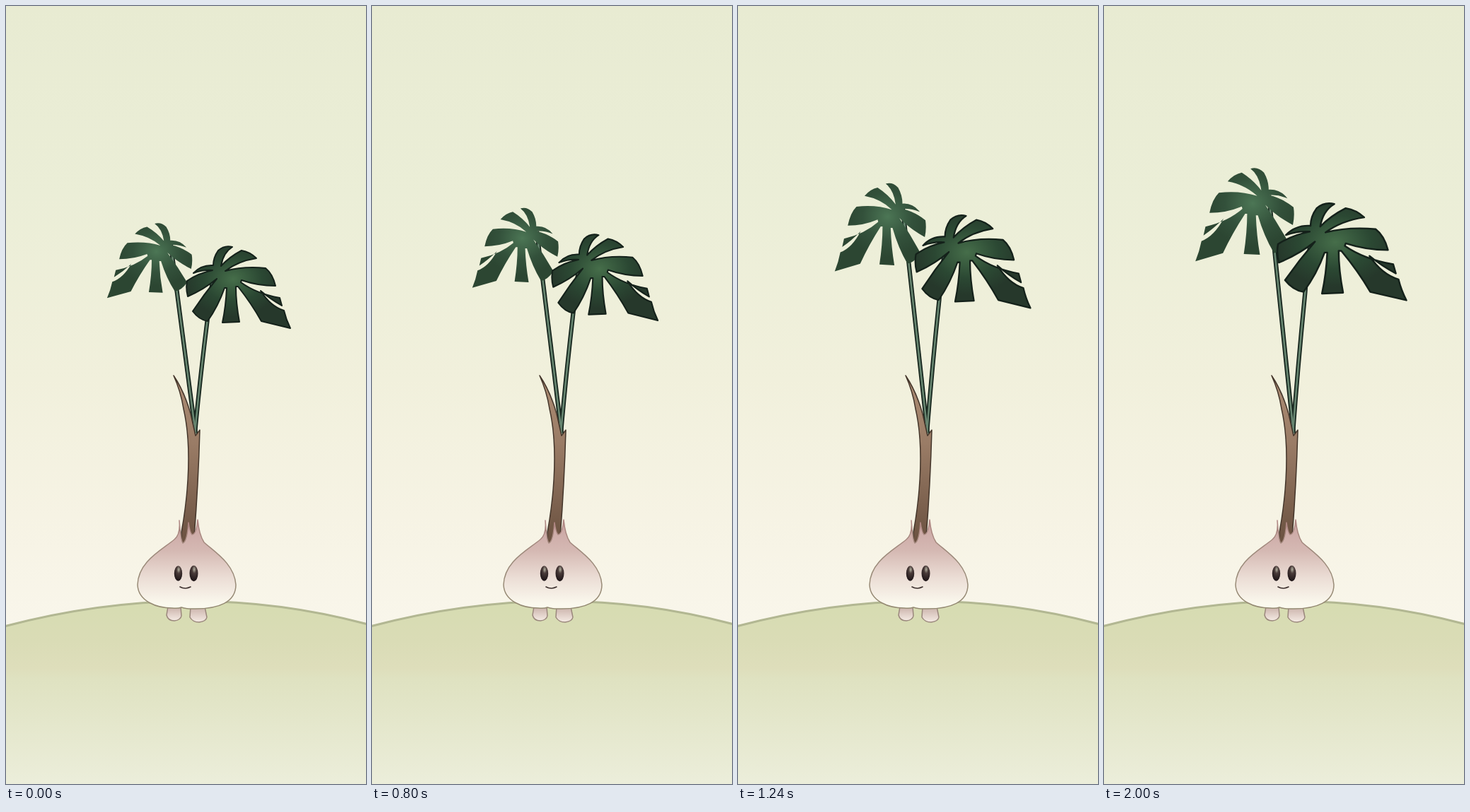
These frames come from a looping animation (509 px wide and 1101 px high, 2.04 s). An HTML page:

```html
<!DOCTYPE html>
<html lang="en">
<head>
<meta charset="utf-8">
<title>Growing sprout</title>
<style>
  html, body { margin: 0; width: 100%; height: 100%; overflow: hidden; }
  svg { display: block; width: 100%; height: 100%; }
</style>
</head>
<body>
<svg viewBox="0 0 509 1101" fill="none" stroke-linejoin="round">
  <defs>
    <linearGradient id="sky" x2="0" y2="1">
      <stop stop-color="#e8ebd2"/>
      <stop offset=".3" stop-color="#ebeed7"/>
      <stop offset=".6" stop-color="#f1f0dc"/>
      <stop offset=".82" stop-color="#f6f3e4"/>
      <stop offset="1" stop-color="#f9f6eb"/>
    </linearGradient>
    <linearGradient id="grass" x2="0" y2="1">
      <stop stop-color="#d6dcb1"/>
      <stop offset=".22" stop-color="#dadcb6"/>
      <stop offset=".36" stop-color="#dedebb"/>
      <stop offset=".42" stop-color="#dfe2c1"/>
      <stop offset="1" stop-color="#eceedb"/>
    </linearGradient>
    <linearGradient id="bark" x2="0" y2="1">
      <stop stop-color="#ad8d74"/>
      <stop offset=".4" stop-color="#9a7c66"/>
      <stop offset="1" stop-color="#69503f"/>
    </linearGradient>
    <linearGradient id="skin" x2="0" y2="1">
      <stop stop-color="#c9a3a1"/>
      <stop offset=".35" stop-color="#d5b9b3"/>
      <stop offset=".65" stop-color="#ebddd5"/>
      <stop offset=".95" stop-color="#fbf9ee"/>
    </linearGradient>
    <linearGradient id="skinEdge" x2="0" y2="1">
      <stop stop-color="#b08582"/>
      <stop offset=".4" stop-color="#9c8a7b"/>
      <stop offset="1" stop-color="#948a72"/>
    </linearGradient>
    <linearGradient id="foot" x2="0" y2="1">
      <stop stop-color="#c9b0a8"/>
      <stop offset="1" stop-color="#f5ebe4"/>
    </linearGradient>
    <radialGradient id="iris" cx=".55" cy=".25" r=".7">
      <stop stop-color="#b4b3a2"/>
      <stop offset=".35" stop-color="#4a3b39"/>
      <stop offset="1" stop-color="#1f1618"/>
    </radialGradient>
    <radialGradient id="backGreen" cx=".42" cy=".38" r=".46">
      <stop stop-color="#4c7655"/>
      <stop offset=".6" stop-color="#33513b"/>
      <stop offset="1" stop-color="#2c4632"/>
    </radialGradient>
    <radialGradient id="frontGreen" cx=".45" cy=".4" r=".46">
      <stop stop-color="#466e4a"/>
      <stop offset=".6" stop-color="#2b4833"/>
      <stop offset="1" stop-color="#26382b"/>
    </radialGradient>
    <path id="leaf" d="M320 341Q309 338 300 346Q293 356 293 367Q276 366 265 378
      Q279 373 292 374Q272 378 256 389Q254 400 257 411Q280 401 298 386Q280 408 264 432
      Q273 444 285 446Q300 425 309 399L312 399Q311 424 306 448L330 447Q325 420 325 397L328 397
      Q347 421 361 446L402 456Q396 444 393 431Q374 425 360 403Q374 415 390 424L387 413
      Q354 407 332 391L333 388Q356 396 381 396Q377 379 367 371Q336 368 310 375Q328 361 354 357
      Q345 348 333 346Q316 355 304 368Q307 349 320 341Z"/>
    <g id="stalks">
      <path d="M233 338L268 605"/>
      <path d="M297 372Q289 396 284.5 446Q274 530 267 605"/>
    </g>
  </defs>

  <path fill="url(#sky)" d="M0 0H509V880H0Z"/>
  <path fill="url(#grass)" stroke="#b2b792" stroke-width="3" d="M-6 879Q262 807 515 876V1105H-6Z"/>

  <g id="stems">
    <use href="#stalks" stroke="#16251d" stroke-width="6.2"/>
    <use href="#stalks" stroke="#66846f" stroke-width="2.7"/>
  </g>
  <use id="backLeaf" href="#leaf" fill="url(#backGreen)"/>
  <use id="frontLeaf" href="#leaf" fill="url(#frontGreen)" stroke="#14211a" stroke-width="2"/>

  <path fill="url(#bark)" stroke="#43352a" stroke-width="1.5" d="M237 523Q252 545 261 577
    L268 608L274 600Q272 675 266 752L248 762V745Q258 690 258 640Q258 600 251 570Q247 545 237 523Z"/>

  <g fill="url(#foot)" stroke="#9a877c" stroke-width="1.5">
    <path d="M229 850L227 862Q229 870 238 870Q247 869 248 863L247 850Z"/>
    <path d="M261 850L260 865Q264 872 273 872Q283 871 284 865L281 850Z"/>
  </g>
  <path fill="url(#skin)" stroke="url(#skinEdge)" stroke-width="1.5" d="M245 728
    Q247 748 238 755C220 770 187 786 186 819C187 843 214 852 235 852Q243 853 248 851
    Q254 853 263 853C302 854 325 843 325 819C323 789 294 772 280 759Q273 748 271 727
    Q269 748 263 748Q260 745 258 731Q256 758 250 760Q247 756 245 728Z"/>

  <g fill="url(#iris)">
    <ellipse cx="243.5" cy="803" rx="5.7" ry="10.7"/>
    <ellipse cx="265.5" cy="803" rx="6" ry="11.3"/>
  </g>
  <path stroke="#3b2e2c" stroke-width="1.6" stroke-linecap="round" d="M246 822Q253 826 261 822"/>
</svg>
<script>
  const LOOP = 2040, STEP = 40;
  const [stems, backLeaf, frontLeaf] =
    ['stems', 'backLeaf', 'frontLeaf'].map(id => document.getElementById(id));

  // Sine ease between two points of the loop.
  function ease(u, from, to) {
    const v = Math.min(1, Math.max(0, (u - from) / (to - from)));
    return (1 - Math.cos(Math.PI * v)) / 2;
  }

  // Scales an element around (cx, cy) and puts that point at (x, y).
  function place(element, cx, cy, x, y, sx, sy) {
    element.setAttribute('transform', `matrix(${sx} 0 0 ${sy} ${x - sx * cx} ${y - sy * cy})`);
  }

  function draw(now) {
    const u = Math.floor(now % LOOP / STEP) * STEP / LOOP;
    const rise = ease(u, .135, .865);
    const spread = ease(u, .25, 1.02);
    place(stems, 267, 605, 267, 605, 1, 1 + .263 * rise);
    place(backLeaf, 297, 340, 229, 307 - 78 * rise, -.82 * (1 + .16 * spread), .915 * (1 + .245 * rise));
    place(frontLeaf, 297, 340, 297, 340 - 61 * rise, 1 + .245 * spread, 1 + .185 * rise);
    requestAnimationFrame(draw);
  }
  draw(performance.now());
</script>
</body>
</html>
```
